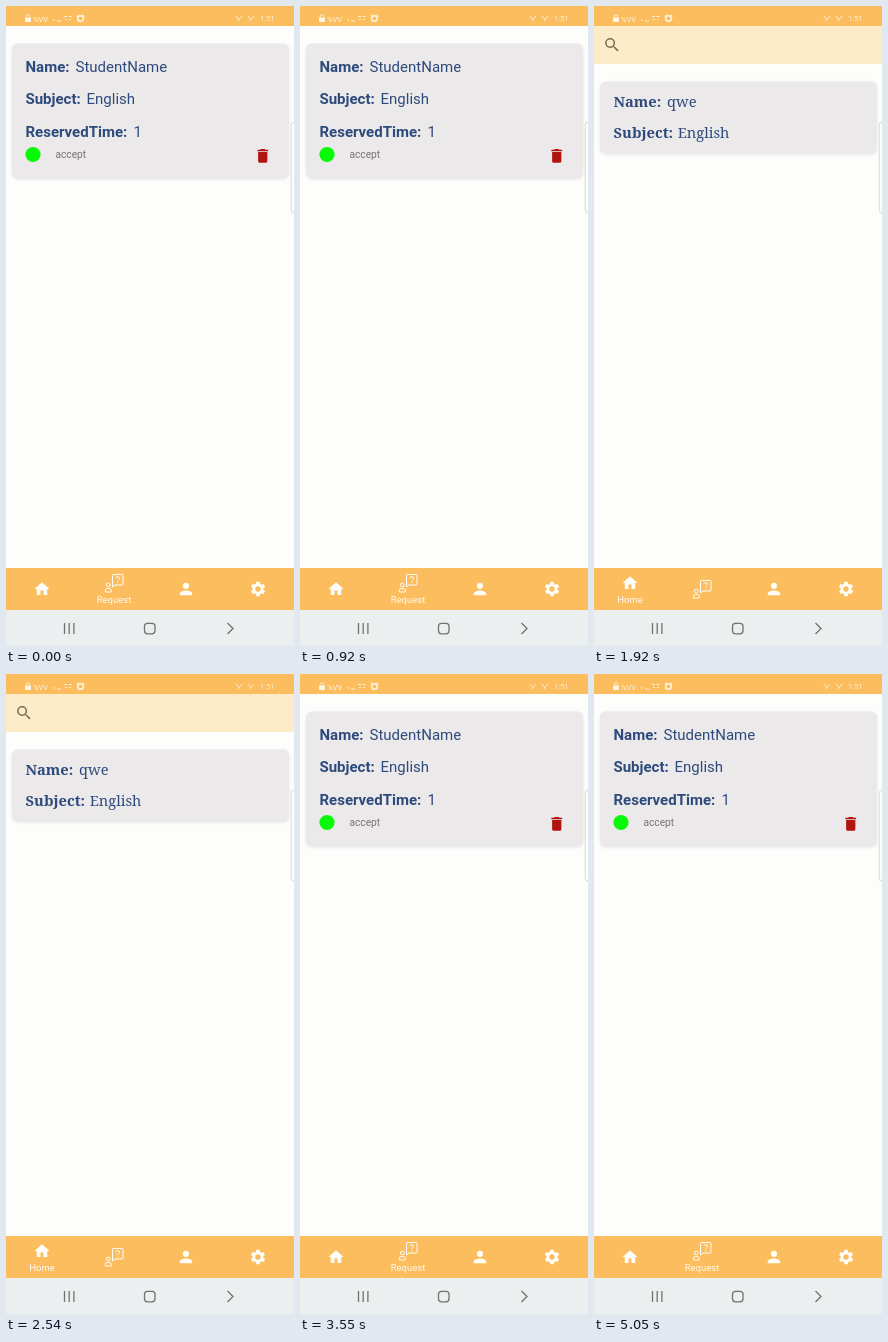
Animation of 288x640 px, one loop 5.12 s. Source, as an HTML page:

```html
<!DOCTYPE html>
<html lang="en">
<head>
<meta charset="utf-8">
<title>Tutoring app tabs</title>
<style>
html, body { margin: 0; width: 100%; height: 100%; overflow: hidden; background: #fdfdfb; }
svg { display: block; width: 288px; height: 640px; }
text { font-family: Roboto, Arial, sans-serif; }
.field text { font-size: 15px; fill: #2d4a7c; }
.serif text { font: 14.7px "Noto Serif", serif; fill: #2d4a7c; }
.field .key, .serif .key { font-weight: 700; }
.label { font-size: 9.5px; fill: #fffaf0; text-anchor: middle; }
.card { fill: #ece9ea; filter: drop-shadow(0 1px 1.5px #b9b4d055); }
.line { fill: none; stroke: #fffdf8; stroke-width: 1; }
</style>
</head>
<body>
<svg viewBox="0 0 288 640">
  <rect width="288" height="640" fill="#fdfdfb"/>

  <g id="request">
    <rect class="card" x="6" y="37.5" width="277" height="135" rx="6"/>
    <g class="field">
      <text class="key" x="19.5" y="66">Name:</text><text x="69.5" y="66">StudentName</text>
      <text class="key" x="19.5" y="98">Subject:</text><text x="80.5" y="98">English</text>
      <text class="key" x="19.5" y="130.5">ReservedTime:</text><text x="127.5" y="130.5">1</text>
    </g>
    <circle cx="27" cy="148.5" r="7.6" fill="#08fa08"/>
    <text x="49.5" y="152" font-size="10.2" fill="#757372">accept</text>
    <path transform="translate(247.5 140.6) scale(.77)" fill="#b01510"
      d="M6 19c0 1.1.9 2 2 2h8c1.1 0 2-.9 2-2V7H6zM19 4h-3.5l-1-1h-5l-1 1H5v2h14z"/>
  </g>

  <g id="home">
    <rect y="20" width="288" height="542" fill="#fdfdfb"/>
    <rect y="20" width="288" height="38" fill="#fdebc8"/>
    <path transform="translate(8.8 29.6) scale(.77)" fill="#7d6c58"
      d="M15.5 14h-.79l-.28-.27A6.47 6.47 0 0 0 16 9.5 6.5 6.5 0 1 0 9.5 16c1.61 0 3.09-.59 4.23-1.57l.27.28v.79l5 4.99L20.49 19zM9.5 14a4.5 4.5 0 1 1 0-9 4.5 4.5 0 0 1 0 9z"/>
    <rect class="card" x="6" y="75.5" width="277" height="72" rx="6"/>
    <g class="serif">
      <text class="key" x="19.5" y="101.3">Name:</text><text x="73" y="101.3">qwe</text>
      <text class="key" x="19.5" y="131.5">Subject:</text><text x="83.7" y="131.5">English</text>
    </g>
  </g>

  <rect x="285.2" y="115.5" width="12" height="92" rx="4" fill="#fdfdfb" stroke="#d9d9d2"/>

  <rect width="288" height="20" fill="#fbbd5e"/>
  <g fill="#fff6e4">
    <rect x="19" y="11.5" width="6" height="4.5" rx="1"/>
    <path d="M20.2 12v-1.5a1.8 1.8 0 0 1 3.6 0V12" fill="none" stroke="#fff6e4" stroke-width=".8"/>
    <text x="27" y="15.5" font-size="7.5">%VV</text>
    <path d="M47 14h2M51 15h4M58 10.5h3M62.5 10.5h3M59 13.5h2M63 13.5h2" stroke="#fff0cc"/>
    <circle cx="74.5" cy="12.5" r="2.8" fill="none" stroke="#fff6e4" stroke-width="1.5"/>
    <path d="M70.5 10.5l2-2M78.5 10.5l-2-2" stroke="#fff6e4"/>
    <path d="M230 10l3 4M236 10l-4 5M242 10l3 4M248 10l-4 5" stroke="#fff0d8" stroke-width=".9"/>
    <text x="254" y="15" font-size="7.5" opacity=".85">1:51</text>
  </g>

  <rect y="562" width="288" height="42" fill="#fbbd5e"/>
  <g id="homeIcon">
    <path transform="translate(27 574) scale(.75)" fill="#fffdf8" d="M10 20v-6h4v6h5v-8h3L12 3 2 12h3v8z"/>
  </g>
  <text id="homeLabel" class="label" x="36" y="597">Home</text>
  <g id="askIcon" class="line">
    <path d="M107 574.5h9q1 0 1 1v8.5q0 1-1 1h-7l-2.5 2v-11.5q0-1 .5-1z"/>
    <path d="M110 578.3q0-1.6 1.8-1.6t1.8 1.5q0 .9-1 1.5t-.8 1.5M111.8 582.2v1"/>
    <circle cx="102.3" cy="585" r="1.9"/>
    <path d="M99.3 592v-1.5q0-2 2-2h2q2 0 2 2v1.5z"/>
  </g>
  <text id="askLabel" class="label" x="108" y="597">Request</text>
  <g fill="#fffdf8">
    <path transform="translate(170.6 573.6) scale(.78)"
      d="M12 12a4 4 0 1 0 0-8 4 4 0 0 0 0 8zm0 2c-2.67 0-8 1.34-8 4v2h16v-2c0-2.66-5.33-4-8-4z"/>
    <path transform="translate(243 574) scale(.75)"
      d="M19.14 12.94a7 7 0 0 0 0-1.88l2.03-1.58a.5.5 0 0 0 .12-.61l-1.92-3.32a.5.5 0 0 0-.59-.22l-2.39.96a7 7 0 0 0-1.62-.94l-.36-2.54A.48.48 0 0 0 14 2.4h-4a.48.48 0 0 0-.47.41l-.36 2.54a7 7 0 0 0-1.62.94l-2.39-.96a.5.5 0 0 0-.59.22L2.74 8.87a.5.5 0 0 0 .12.61l2.03 1.58a7 7 0 0 0 0 1.88l-2.03 1.58a.5.5 0 0 0-.12.61l1.92 3.32c.12.22.37.29.59.22l2.39-.96c.5.38 1.03.7 1.62.94l.36 2.54c.05.24.24.41.48.41h4c.24 0 .44-.17.47-.41l.36-2.54a7 7 0 0 0 1.62-.94l2.39.96c.22.08.47 0 .59-.22l1.92-3.32a.5.5 0 0 0-.12-.61zM12 15.6a3.6 3.6 0 1 1 0-7.2 3.6 3.6 0 0 1 0 7.2z"/>
  </g>

  <rect y="604" width="288" height="36" fill="#eceff0"/>
  <g fill="none" stroke="#73736c" stroke-width="1.3">
    <path d="M58.5 617v11M63.2 617v11M67.9 617v11M221.5 617l5.5 5.5-5.5 5.5"/>
    <rect x="138.500" y="617.3" width="10.5" height="10.5" rx="3"/>
  </g>
</svg>
<script>
const LOOP = 5120;
const TO_HOME = 1340, TO_REQUEST = 2680, FADE = 200, LOADED = 3100;
const parts = Object.fromEntries(
  ["request", "home", "homeIcon", "homeLabel", "askIcon", "askLabel"]
    .map(id => [id, document.getElementById(id)]));

function ease(t, start) {
  const p = Math.min(1, Math.max(0, (t - start) / FADE));
  return p < 0.5 ? 2 * p * p : 1 - 2 * (1 - p) ** 2;
}

function setTab(icon, label, active) {
  icon.setAttribute("transform", `translate(0 ${-6 * active})`);
  label.setAttribute("opacity", active);
}

function draw(t) {
  const home = ease(t, TO_HOME) - ease(t, TO_REQUEST);
  parts.home.setAttribute("opacity", home);
  // The list is empty after the tab change until its data arrives.
  parts.request.setAttribute("opacity", t >= TO_REQUEST && t < LOADED ? 0 : 1);
  setTab(parts.homeIcon, parts.homeLabel, home);
  setTab(parts.askIcon, parts.askLabel, 1 - home);
}

const start = performance.now();
function tick() {
  draw((performance.now() - start) % LOOP);
  requestAnimationFrame(tick);
}
draw(0);
requestAnimationFrame(tick);
</script>
</body>
</html>
```
